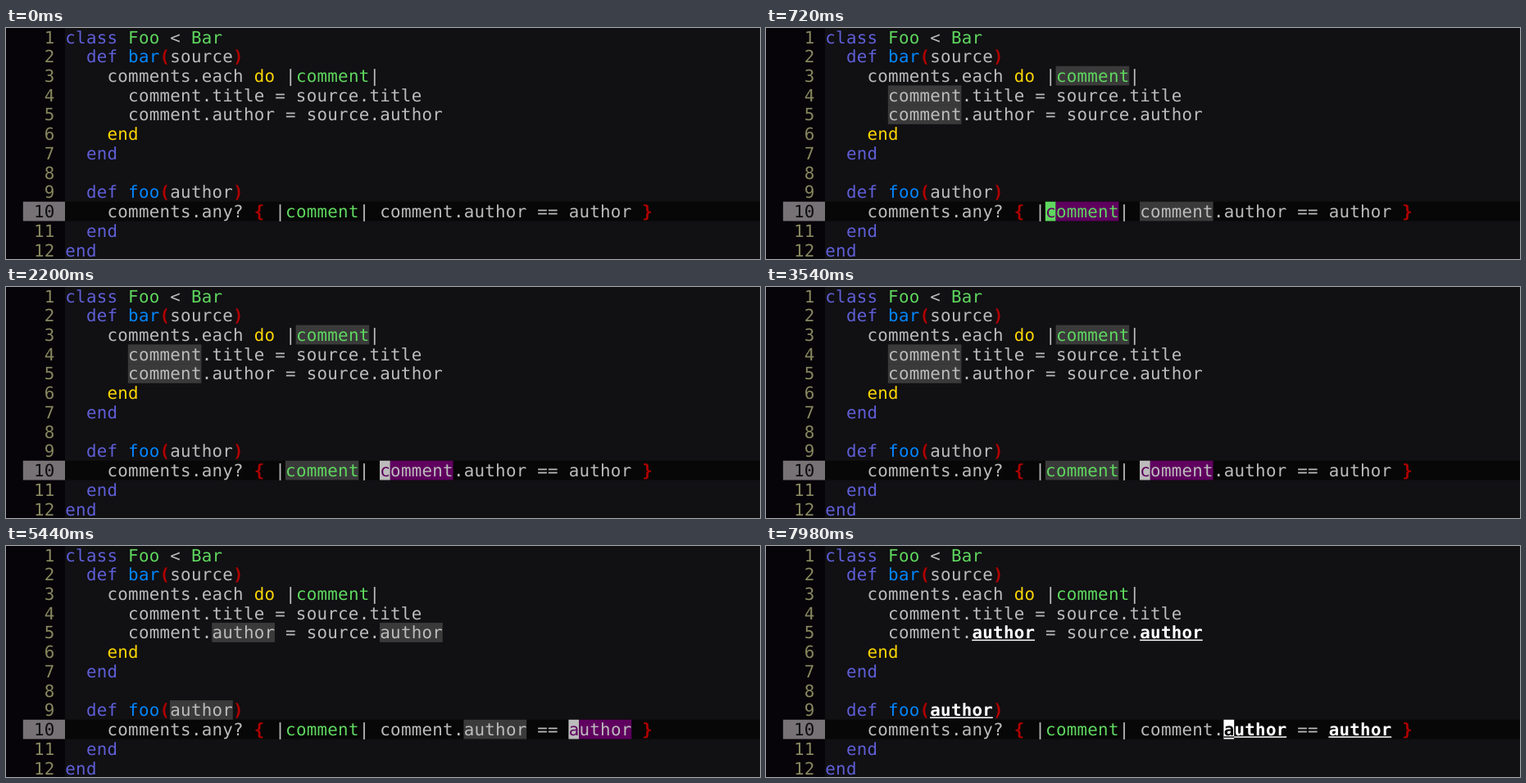
Write an HTML page that moves like this. It is 920 px wide and 283 px high and loops after 8 s.

```html
<!DOCTYPE html>
<html lang="en">
<head>
<meta charset="utf-8">
<title>Word highlighting in an editor</title>
<style>
  html, body { margin: 0; width: 100%; height: 100%; overflow: hidden; background: #111013; }
  svg { display: block; width: 920px; height: 283px; }
  text {
    font: 20.8px "DejaVu Sans Mono", monospace;
    letter-spacing: .278px;
    white-space: pre;
    text-rendering: geometricPrecision;
  }
  text.bold { font-weight: 700; }
</style>
</head>
<body>
<svg viewBox="0 0 920 283"><g id="base"></g><g id="code"></g></svg>
<script>
const LOOP = 8000, BLINK = 395, LAG = 30;
const CELL = 12.8, ROW = 23.73, LEFT = 72, TOP = -0.8, ASCENT = 19.3, BEARING = 0.3;
const CURSOR_ROW = 9;
const PAGE = '#111013', GUTTER = '#060408', CURRENT = '#070707';
const GREY = '#3a3a3a', PURPLE = '#5f005f', WHITE = '#ffffff';
const COLORS = {
  t: '#bcbcbc', k: '#5f5fd7', c: '#5fd75f', f: '#0087ff', p: '#af0000', y: '#ffd700'
};

// Each line alternates colour key and text.
const LINES = [
  ['k', 'class ', 'c', 'Foo', 't', ' < ', 'c', 'Bar'],
  ['k', '  def ', 'f', 'bar', 'p', '(', 't', 'source', 'p', ')'],
  ['t', '    comments.each ', 'y', 'do', 't', ' |', 'c', 'comment', 't', '|'],
  ['t', '      comment.title = source.title'],
  ['t', '      comment.author = source.author'],
  ['y', '    end'],
  ['k', '  end'],
  [],
  ['k', '  def ', 'f', 'foo', 'p', '(', 't', 'author', 'p', ')'],
  ['t', '    comments.any? ', 'p', '{', 't', ' |', 'c', 'comment',
   't', '| comment.author == author ', 'p', '}'],
  ['k', '  end'],
  ['k', 'end']
].map(parts => {
  let text = '', keys = '';
  for (let i = 0; i < parts.length; i += 2) {
    text += parts[i + 1];
    keys += parts[i].repeat(parts[i + 1].length);
  }
  return { text, keys };
});

// Key presses: w goes to the next word, # searches backwards, '' only wakes the cursor.
const PRESSES = [
  [140, ''], [690, 'w'], [1870, 'w'], [2170, 'w'], [3540, 'w'],
  [3750, 'w'], [5130, 'w'], [5410, 'w'], [6640, ''], [7180, '#']
];

const base = document.getElementById('base');
const code = document.getElementById('code');
const row10 = LINES[CURSOR_ROW].text;
const colX = col => LEFT + col * CELL;
const rowY = row => TOP + row * ROW;

function add(parent, name, attrs, text) {
  const el = document.createElementNS('http://www.w3.org/2000/svg', name);
  for (const key in attrs) el.setAttribute(key, attrs[key]);
  if (text) el.textContent = text;
  parent.append(el);
}

function rect(parent, x, y, width, height, fill) {
  add(parent, 'rect', { x, y, width, height, fill });
}

function label(parent, row, col, text, fill, bold) {
  add(parent, 'text', {
    x: colX(col) + BEARING, y: rowY(row) + ASCENT, fill, class: bold ? 'bold' : ''
  }, text);
}

function drawBase() {
  rect(base, 0, 0, 920, 283, PAGE);
  rect(base, 0, 0, LEFT, 283, GUTTER);
  rect(base, LEFT, rowY(CURSOR_ROW), 920 - LEFT, ROW, CURRENT);
  rect(base, colX(-4), rowY(CURSOR_ROW), 4 * CELL, ROW, '#767276');
  LINES.forEach((line, row) => {
    const number = String(row + 1);
    label(base, row, -1 - number.length, number, row === CURSOR_ROW ? '#0c0c0c' : '#87875f');
  });
}

function drawRun(row, col, text, style) {
  const x = colX(col), y = rowY(row), width = text.length * CELL;
  if (style.back) rect(code, x, y, width, ROW, style.back);
  label(code, row, col, text, style.fill, style.bold);
  if (style.line) rect(code, x, y + ASCENT + 1.2, width, 1.5, style.fill);
}

function drawLine(row, matches, { col: cursor, shown, search }) {
  const { text, keys } = LINES[row];
  const here = row === CURSOR_ROW;
  const styleAt = col => {
    const match = matches.find(m => col >= m.from && col < m.to);
    const active = match && here && cursor >= match.from && cursor < match.to;
    const style = { fill: COLORS[keys[col]], back: '', bold: keys[col] === 'p', line: false };
    if (match && search) {
      style.fill = WHITE;
      style.bold = style.line = true;
    } else if (match) {
      style.back = active ? PURPLE : GREY;
    }
    if (here && shown && col === cursor) {
      [style.fill, style.back] = [style.back || CURRENT, style.fill];
    }
    return style;
  };
  let start = 0;
  while (start < text.length) {
    const style = styleAt(start), id = JSON.stringify(style);
    let end = start + 1;
    while (end < text.length && JSON.stringify(styleAt(end)) === id) end++;
    drawRun(row, start, text.slice(start, end), style);
    start = end;
  }
}

function findWords(text, word) {
  if (!word) return [];
  return [...text.matchAll(new RegExp('\\b' + word + '\\b', 'g'))]
    .map(m => ({ from: m.index, to: m.index + word.length }));
}

const wordAt = col => row10.slice(col).match(/^\w*/)[0];

function nextWord(col) {
  return [...row10.matchAll(/\w+|[^\w\s]+/g)].find(m => m.index > col).index;
}

function previousMatch(col) {
  return findWords(row10, wordAt(col)).findLast(m => m.from < col).from;
}

function stateAt(t) {
  let col = row10.indexOf('|'), search = false, shown = false;
  for (const [time, key] of PRESSES) {
    if (t < time) break;
    shown = Math.floor((t - time) / BLINK) % 2 === 0;
    if (t < time + LAG) break;
    if (key === 'w') col = nextWord(col);
    if (key === '#') {
      col = previousMatch(col);
      search = true;
    }
  }
  return { col, shown, search };
}

function draw(state) {
  const word = wordAt(state.col);
  code.replaceChildren();
  LINES.forEach((line, row) => drawLine(row, findWords(line.text, word), state));
}

let drawn = '';
const begin = performance.now();
function frame(now) {
  const state = stateAt(Math.max(0, now - begin) % LOOP);
  const id = JSON.stringify(state);
  if (id !== drawn) {
    drawn = id;
    draw(state);
  }
  requestAnimationFrame(frame);
}

drawBase();
frame(begin);
</script>
</body>
</html>
```
